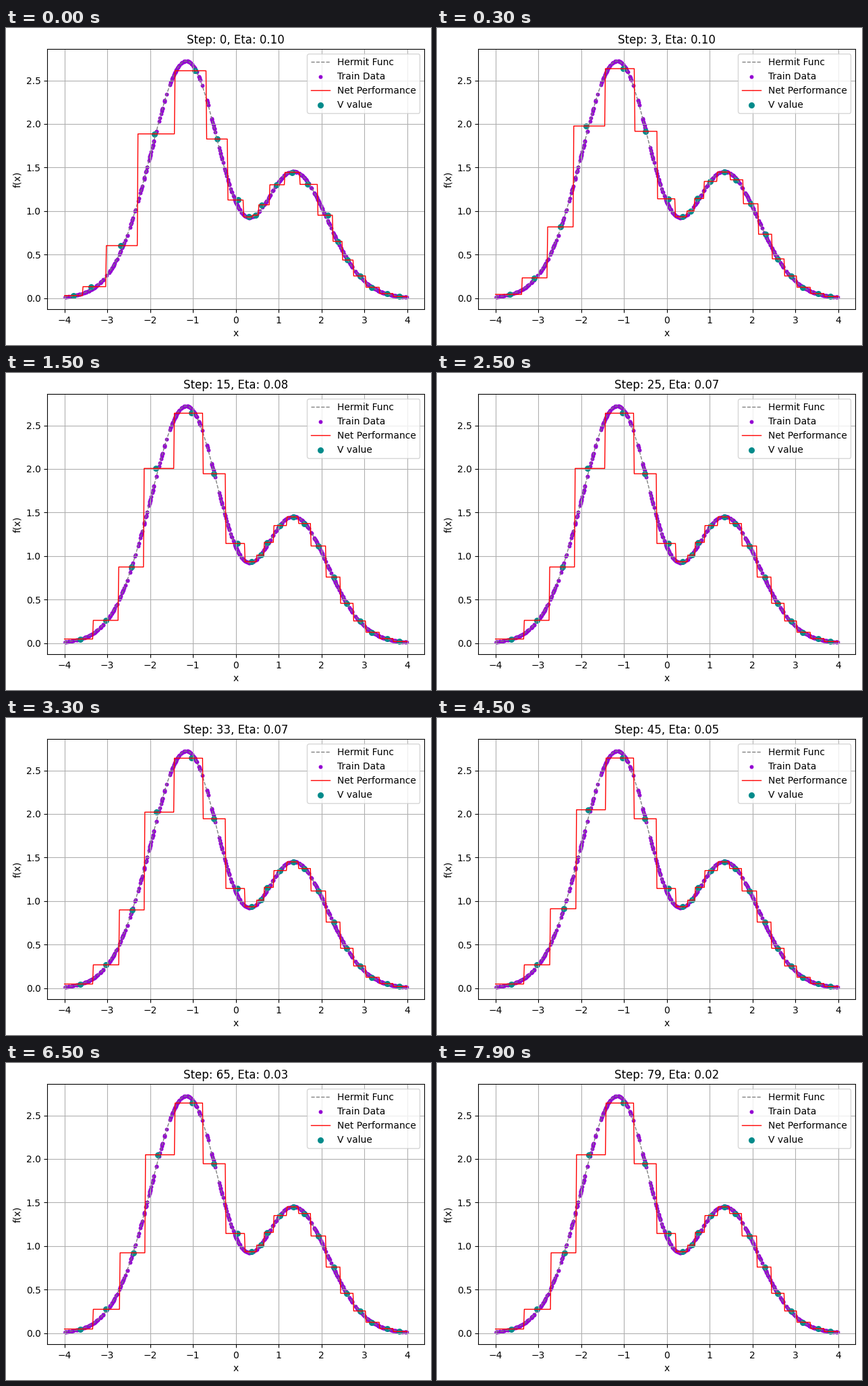
Recreate the animation shown at these times as a matplotlib script. Size 630 by 469 pixels, loop 8 s.

```python
import numpy as np
import matplotlib.pyplot as plt
from matplotlib.animation import FuncAnimation

W, H, DPI = 630, 469, 100
STEPS, TOTAL = 80, 99

plt.rcParams["font.family"] = "DejaVu Sans"


def hermit(x):
    return 1.1 * (1 - x + 2 * x**2) * np.exp(-x**2 / 2)


# Positions of the trained units along x
REST = np.array([-3.64, -3.04, -2.45, -1.88, -1.03, -0.51, 0.04, 0.37, 0.58,
                 0.73, 1.03, 1.34, 1.59, 1.92, 2.29, 2.59, 2.90, 3.17, 3.53,
                 3.81])


def bump(centre, width, height):
    """Smooth push on the units around one index."""
    i = np.arange(len(REST))
    return height * np.exp(-((i - centre) / width)**2 / 2)


# Distance covered while settling, then a slow drift on the left slope
PULL = (bump(1.2, 0.9, 0.35) + bump(4.5, 1, -0.09) + bump(8.6, 1.4, 0.13)
        + bump(13, 0.75, -0.22))
DRIFT = bump(2.5, 0.6, 0.08)

grid = np.linspace(-4, 4, 500)
curve = hermit(grid)
train = np.random.default_rng(4).uniform(-4, 4, 500)


def network(step):
    """Unit positions, their outputs and the winning unit for each x."""
    x = REST - PULL * np.exp(-0.6 * step)
    x = x + DRIFT * np.clip((step - 7) / 50, 0, 1)
    winner = np.searchsorted((x[1:] + x[:-1]) / 2, grid)
    # Each unit answers with the mean of the curve over its cell
    y = np.bincount(winner, curve) / np.bincount(winner)
    return x, y, winner


fig = plt.figure(figsize=(W / DPI, H / DPI), dpi=DPI, facecolor="white")
ax = fig.add_axes([61.25 / W, 53.1 / H, 559 / W, 384.6 / H])

ax.plot(grid, curve, color="gray", ls="--", lw=1, label="Hermit Func")
ax.scatter(train, hermit(train), s=10, color="darkviolet", label="Train Data")
net, = ax.plot([], [], color="red", lw=1, label="Net Performance")
dots = ax.scatter(REST, hermit(REST), s=30, color="darkcyan", label="V value")

ax.set(xlim=(-4.4, 4.4), ylim=(-0.1249, 2.8586), xlabel="x", ylabel="f(x)")
ax.set_xticks(range(-4, 5))
ax.set_yticks(np.arange(0, 2.6, 0.5))
ax.grid(True)
ax.legend(loc="upper right")
title = ax.set_title("")


def update(step):
    x, y, winner = network(step)
    net.set_data(grid, y[winner])
    dots.set_offsets(np.column_stack([x, y]))
    title.set_text(f"Step: {step}, Eta: {0.1 * (1 - step / TOTAL):.2f}")
    return net, dots, title


anim = FuncAnimation(fig, update, frames=STEPS, interval=100, repeat=True,
                     repeat_delay=0, blit=False)
plt.show()
```
